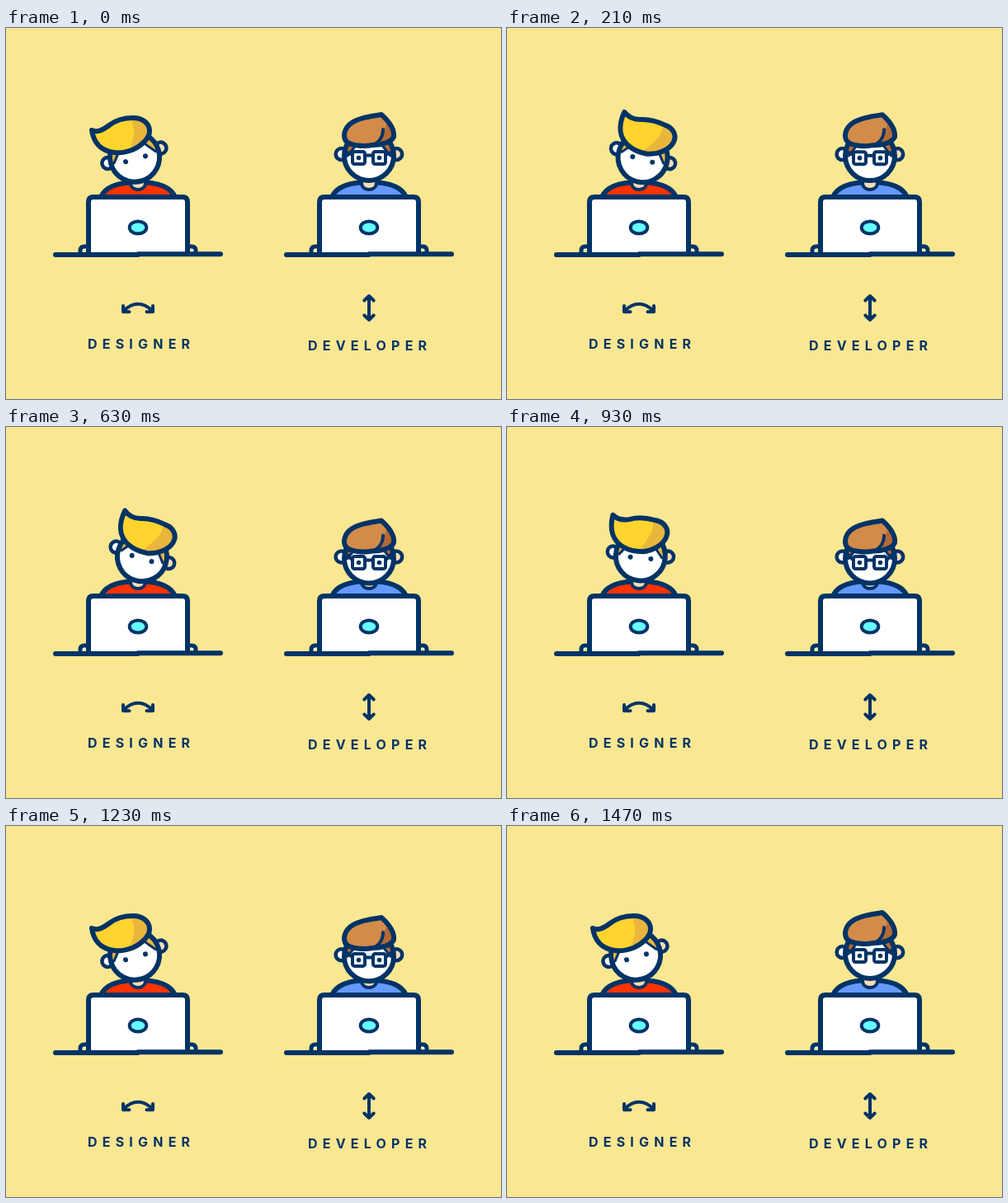
An HTML page that plays this animation: 600 by 450 pixels, repeating every 1.8 s.

```html
<!DOCTYPE html>
<html lang="en">
<head>
<meta charset="utf-8">
<title>Designer and developer</title>
<style>
  html, body { margin: 0; width: 100%; height: 100%; overflow: hidden; background: #fae792; }
  svg { display: block; width: 100vw; height: 100vh; }
  .ink { stroke: #036; stroke-width: 6; stroke-linecap: round; stroke-linejoin: round; fill: none; }
  .mid { stroke-width: 4.5; }
  .thin { stroke-width: 4; }
  .fine { stroke-width: 3; }
  .dot { fill: #036; }
  text { font: 700 16px Inter, "Open Sans", sans-serif; letter-spacing: 6.2px; fill: #036; }
</style>
</head>
<body>
<svg viewBox="0 0 600 450">
  <defs>
    <clipPath id="face"><circle r="30"/></clipPath>

    <!-- Head centred on 0,0; currentColor is the shaded hair -->
    <g id="head">
      <circle class="ink mid" cx="-33.4" cy="-2" r="7" style="fill:#fff"/>
      <circle class="ink mid" cx="33.2" cy="-2" r="7" style="fill:#fbdcb8"/>
      <circle r="30" fill="#fff"/>
      <g clip-path="url(#face)">
        <path id="burn" class="ink fine" d="M14-15L26 0L40 0V-32H10Z" style="fill:currentColor"/>
        <use href="#burn" transform="scale(-1 1)"/>
      </g>
      <circle class="ink" r="30"/>
    </g>

    <!-- Shirt takes its colour from currentColor -->
    <g id="torso">
      <path class="ink" d="M115 205C121 191 140 187 160 187S199 191 205 205Z" style="fill:currentColor"/>
      <path class="ink thin" d="M151 184V188.5C152 198.5 168 198.5 169 188.5V184Z" style="fill:#fbdcb8"/>
    </g>

    <g id="desk">
      <path class="ink" style="fill:#fff;stroke-width:5" d="M90 273V270Q90 265 95 265H100M230 273V270Q230 265 225 265H220"/>
      <path class="ink" d="M100 274V211Q100 205 106 205H214Q220 205 220 211V274" style="fill:#fff"/>
      <path class="ink" d="M60 275H160M160 274.2H260"/>
      <ellipse class="ink thin" cx="160" cy="242" rx="10.3" ry="7.5" style="fill:#6ff"/>
    </g>

    <path id="quiff"/>
    <clipPath id="quiffClip"><use href="#quiff"/></clipPath>
    <path id="crop" d="M455 105C442 107 428 109 419 115C410 121 408 131 412 137C417 143 434 144 444 142C454 142 467 139 470 132C471 123 464 113 455 105Z"/>
    <clipPath id="cropClip"><use href="#crop"/></clipPath>
  </defs>

  <use href="#torso" color="#f30"/>
  <g id="tilt" color="#e9b63d">
    <use href="#head" x="160.4" y="156.3"/>
    <circle class="dot" cx="148.3" cy="158.6" r="3"/>
    <circle class="dot" cx="173.2" cy="158.6" r="3"/>
  </g>
  <g id="sway">
    <use href="#quiff" fill="#e9b63d"/>
    <path clip-path="url(#quiffClip)" fill="#ffd42e" d="M95 100H144C154 110 157 124 154 134Q152 145 144 162H95Z"/>
    <use href="#quiff" class="ink"/>
  </g>
  <use href="#desk"/>

  <use href="#torso" x="280" color="#69f"/>
  <g id="nod" color="#b56a35">
    <use href="#head" x="440" y="155"/>
  </g>
  <path id="arms" class="ink thin"/>
  <g id="specs">
    <rect class="ink thin" x="420" y="150" width="15" height="15" rx="2.5" style="fill:#fff"/>
    <rect class="ink thin" x="445" y="150" width="15" height="15" rx="2.5" style="fill:#fff"/>
    <path class="ink thin" d="M436 154.5H444"/>
    <circle class="dot" cx="427.5" cy="157.5" r="2.8"/>
    <circle class="dot" cx="452.5" cy="157.5" r="2.8"/>
  </g>
  <g id="mop">
    <use href="#crop" fill="#d38b4a"/>
    <path clip-path="url(#cropClip)" fill="#b56a35" d="M455 103C462 111 463 119 457 124C457 134 451 140 444 143H476V103Z"/>
    <use href="#crop" class="ink"/>
    <path class="ink thin" d="M457 123C457 132 452 139 444 142"/>
  </g>
  <use href="#desk" x="280"/>

  <path class="ink thin" d="M142 343.5Q160 326 178 343.5M142 337V344.3H149.5M178 337V344.3H170.5"/>
  <path class="ink thin" d="M440 325V354M434.3 330.5L440 325L445.7 330.5M434.3 348.5L440 354L445.7 348.5"/>
  <text x="99" y="389">DESIGNER</text>
  <text x="366" y="391">DEVELOPER</text>
</svg>
<script>
  const LOOP = 1800, STEP = 30;
  // [there start, there end, back start, back end]
  const TILT = [0, 240, 833, 1073];
  const NOD = [180, 540, 1095, 1470];

  const el = id => document.getElementById(id);
  const set = (id, name, value) => el(id).setAttribute(name, value);
  const shift = (id, y) => set(id, 'transform', `translate(0 ${y})`);

  function ease(t, from, to) {
    const x = Math.min(1, Math.max(0, (t - from) / (to - from)));
    return x * x * (3 - 2 * x);
  }

  const swing = (t, [a, b, c, d]) => ease(t, a, b) - ease(t, c, d);

  // The lock keeps its ends while its middle sags by u
  const quiff = u => `M104 124
    C111 127 117 ${124 + 0.5 * u} 125 ${118 + 0.7 * u}
    C134 ${111 + 0.8 * u} 144 ${109 + 0.7 * u} 154 ${109 + 0.5 * u}
    C166 109 174 116 174 125
    C174 ${134 + 0.5 * u} 164 ${143 + 0.9 * u} 154 ${147.5 + u}
    C145 ${151 + u} 138 ${152 + u} 131 ${151 + u}
    C114 ${149 + u} 106 ${138 + 0.5 * u} 104 124Z`;

  function draw(t) {
    const lean = swing(t, TILT);
    set('tilt', 'transform', `rotate(${33 * lean - 16} 159.5 172)`);
    set('sway', 'transform', `rotate(${33 * lean} 162.3 180.6)`);
    set('quiff', 'd', quiff(5.5 * (1 - (1 - lean) ** 2)));

    // Nearer parts travel further, so the head seems to bow
    const bow = swing(t, NOD);
    shift('nod', 4.5 * bow);
    shift('specs', 7 * bow);
    shift('mop', 8.5 * bow);
    const outer = 150 + 3.5 * bow, inner = 153.5 + 7 * bow;
    set('arms', 'd', `M412 ${outer}L419 ${inner}M468 ${outer}L461 ${inner}`);
  }

  const start = performance.now();
  function tick() {
    const t = (performance.now() - start) % LOOP;
    draw(Math.floor(t / STEP) * STEP);
    requestAnimationFrame(tick);
  }
  tick();
</script>
</body>
</html>
```
